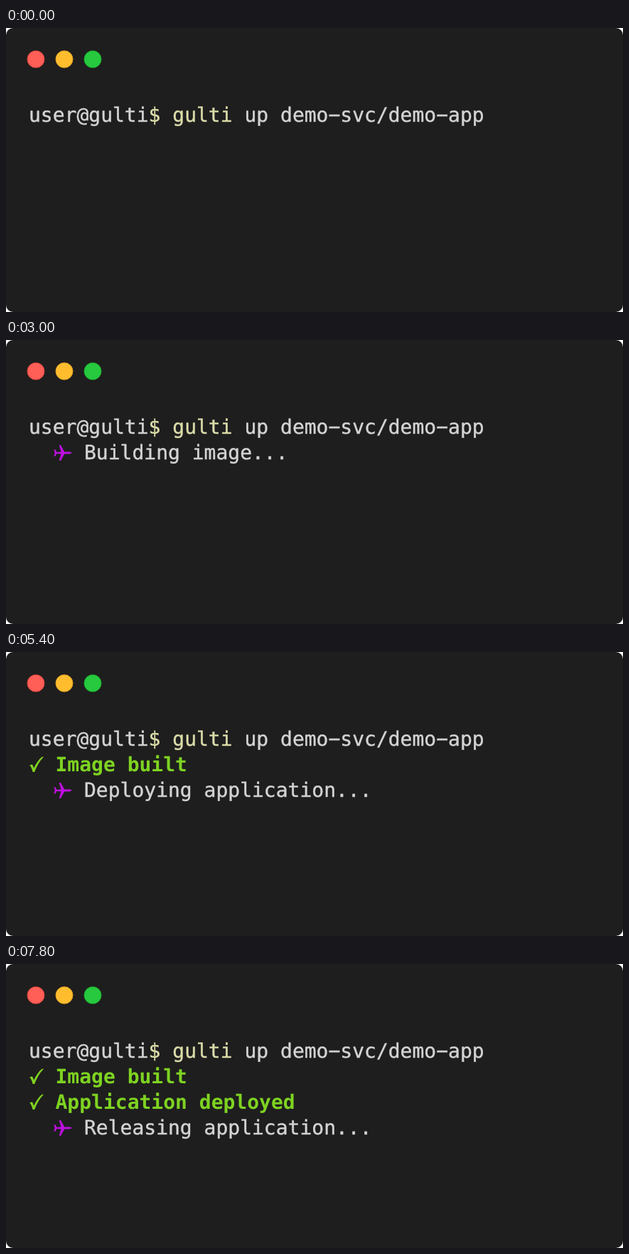
These frames come from a looping animation (868 by 400 pixels, 8 s). An HTML page:

```html
<!DOCTYPE html>
<html lang="en">
<head>
<meta charset="utf-8">
<title>Terminal deploy</title>
<style>
  html, body { margin: 0; width: 100%; height: 100%; overflow: hidden; background: #fff; }
  svg { display: block; width: 868px; height: 400px; }
  text {
    font: 28px "DejaVu Sans Mono", monospace;
    fill: #d4d4d4;
    stroke: #d4d4d4;
    stroke-width: 0.4;
    white-space: pre;
    text-rendering: geometricPrecision;
  }
  .cmd { fill: #dcdcaa; stroke: #dcdcaa; }
  .done { fill: #7ed321; }
  text.done { font-weight: bold; stroke: none; }
  .plane { fill: #bd10e0; }
</style>
</head>
<body>
<svg viewBox="0 0 868 400">
  <rect width="868" height="400" rx="10" fill="#1e1e1e"/>
  <g stroke-width="1">
    <circle cx="42" cy="44" r="12" fill="#ff5f56" stroke="#e0443e"/>
    <circle cx="82" cy="44" r="12" fill="#ffbd2e" stroke="#dea123"/>
    <circle cx="122" cy="44" r="12" fill="#27c93f" stroke="#1aab29"/>
  </g>
  <text x="32" y="132">user@gulti<tspan class="cmd">$ gulti</tspan> up demo−svc/demo−app</text>
  <g id="steps"></g>
  <path id="plane" class="plane" d="M25 0C24.6-.9 23-1.4 21-1.4H14.8L9.6-11H7.3L10-1.4L4.2-1L1.8-4.7H0L1.3 0L0 4.7H1.8L4.2 1L10 1.4L7.3 11H9.6L14.8 1.4H21C23 1.4 24.6 .9 25 0Z"/>
</svg>
<script>
const LOOP = 8000, TICK = 400;
const CELL = 16.857, LINE = 36, FIRST_LINE = 168;
const CHECK = "M33.3-8.6L36.7-9.8C38-8 38.8-6.2 39.1-4.2C42-11 46-16.6 50.5-20.3H53C47-14 43-7 40.2 .9H37.6C37-2.6 35.5-6 33.3-8.6Z";
const steps = [
  { start: 1000, busy: "Building image...", done: "Image built" },
  { start: 3400, busy: "Deploying application...", done: "Application deployed" },
  { start: 5800, busy: "Releasing application..." }
];

const plane = document.getElementById("plane");
const list = document.getElementById("steps");

function add(parent, tag, attrs, content = "") {
  const el = document.createElementNS("http://www.w3.org/2000/svg", tag);
  for (const key in attrs) el.setAttribute(key, attrs[key]);
  el.textContent = content;
  return parent.appendChild(el);
}

function show(el, on) {
  el.setAttribute("visibility", on ? "visible" : "hidden");
}

steps.forEach((step, i) => {
  const row = add(list, "g", { transform: `translate(0 ${FIRST_LINE + i * LINE})` });
  step.busyEl = add(row, "text", { x: 110 }, step.busy);
  step.doneEl = add(row, "g", {});
  if (step.done) {
    add(step.doneEl, "path", { class: "done", d: CHECK });
    add(step.doneEl, "text", { class: "done", x: 69.5 }, step.done);
  }
});

function draw(t) {
  const current = steps.filter(step => t >= step.start).length - 1;
  steps.forEach((step, i) => {
    show(step.busyEl, i === current);
    show(step.doneEl, i < current);
  });
  show(plane, current >= 0);
  if (current < 0) return;

  // The plane hops one cell per tick and wraps after three.
  const cell = Math.floor((t - steps[current].start) / TICK) % 3;
  const y = FIRST_LINE + current * LINE - 9;
  plane.setAttribute("transform", `translate(${33.7 + cell * CELL} ${y})`);
}

const begin = performance.now();
function frame() {
  draw((performance.now() - begin) % LOOP);
  requestAnimationFrame(frame);
}
draw(0);
requestAnimationFrame(frame);
</script>
</body>
</html>
```
